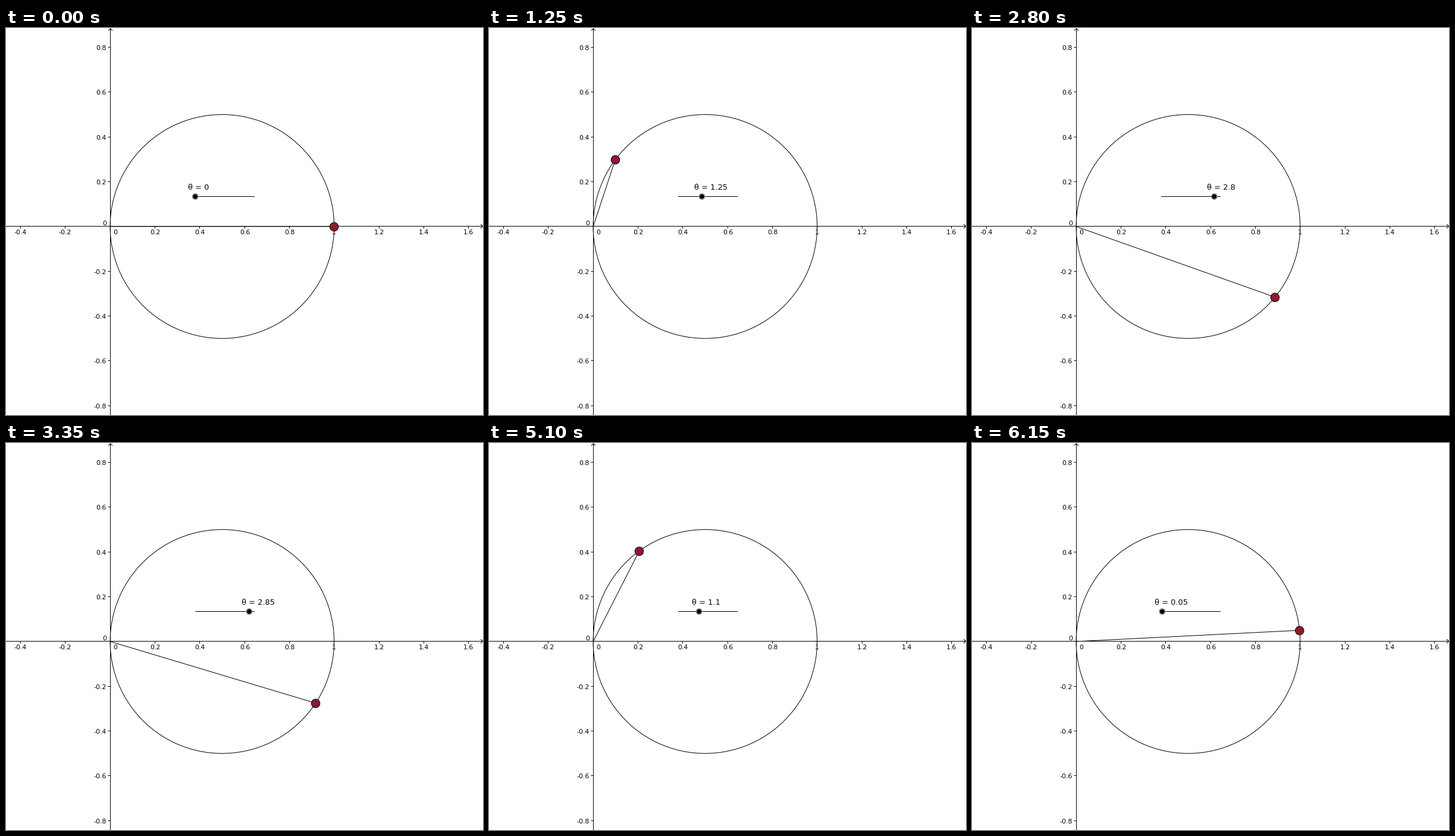
A matplotlib script for the animation above (6200 ms loop, 802 by 651 pixels).

```python
import numpy as np
import matplotlib.pyplot as plt
from matplotlib.animation import FuncAnimation
from matplotlib.patches import Circle

W, H, DPI = 802, 651, 64
PX = 72 / DPI                 # one pixel in points
OX, OY, UNIT = 175.1, 333.9, 376.6
SLIDER_X, SLIDER_Y, SLIDER_LEN = 318.2, 283.5, 100
FRAMES, STEP = 124, 0.05

plt.rcParams["font.family"] = "DejaVu Sans"
plt.rcParams["path.snap"] = False
fig = plt.figure(figsize=(W / DPI, H / DPI), dpi=DPI, facecolor="white")
ax = fig.add_axes([0, 0, 1, 1])
ax.set_xlim(0, W)
ax.set_ylim(H, 0)
ax.axis("off")


def mid(v):
    """Centre of the pixel that holds v."""
    return np.floor(v) + 0.5


def line(xs, ys, z=2):
    return ax.plot(xs, ys, color="black", lw=PX, zorder=z,
                   solid_capstyle="butt", solid_joinstyle="miter")[0]


def label(x, y, s, size=11, ha="center", z=1):
    return ax.text(x, y, s, fontsize=size * PX, ha=ha, va="baseline",
                   color="black", zorder=z)


def disc(x, y, r, z, **style):
    return ax.add_patch(Circle((x, y), r, zorder=z, **style))


def draw_axes():
    ax_x, ax_y = mid(OX), mid(OY)
    line([0, W], [ax_y, ax_y])
    line([ax_x, ax_x], [1, H])
    line([W - 4, W - 0.5, W - 4], [ax_y - 3.5, ax_y, ax_y + 3.5])
    line([ax_x - 3.5, ax_x, ax_x + 3.5], [4.5, 1, 4.5])
    for k in range(-2, 9):
        if k:
            x = mid(OX + k * UNIT / 5)
            line([x, x], [ax_y, ax_y + 4])
            label(x, 347, f"{k / 5:g}")
    for k in range(-4, 5):
        if k:
            y = mid(OY - k * UNIT / 5)
            line([ax_x - 4, ax_x], [y, y])
            label(169, y + 4.5, f"{k / 5:g}", ha="right")
    label(184, 347, "0")
    label(169, 332, "0", ha="right")


draw_axes()
disc(OX + UNIT / 2, OY, UNIT / 2, 2, fill=False, ec="black", lw=PX)
line([SLIDER_X, SLIDER_X + SLIDER_LEN], [SLIDER_Y, SLIDER_Y])

ray = line([OX, OX], [OY, OY], z=3)
dot = disc(OX, OY, 7.2, 5, fc="#8e1a30", ec="black", lw=PX)
halo = disc(SLIDER_X, SLIDER_Y, 5.5, 4, fc="#909090", ec="none")
knob = disc(SLIDER_X, SLIDER_Y, 3.8, 5, fc="black", ec="none")
value = label(0, 272, "", size=13, ha="left", z=4)


def update(i):
    k = min(i, FRAMES - i)    # up to 3.1, then back down
    t = k * STEP
    x = OX + UNIT * np.cos(t) ** 2
    y = OY - UNIT * np.cos(t) * np.sin(t)
    ray.set_data([OX, x], [OY, y])
    dot.center = (x, y + 0.5)

    sx = SLIDER_X + SLIDER_LEN * t / np.pi
    halo.center = knob.center = (sx, SLIDER_Y)
    value.set_x(np.floor(sx) - 12)
    value.set_text(f"θ = {round(t, 2):g}")
    return ray, dot, halo, knob, value


anim = FuncAnimation(fig, update, frames=FRAMES, interval=50,
                     repeat=True, repeat_delay=0, blit=False)
plt.show()
```
